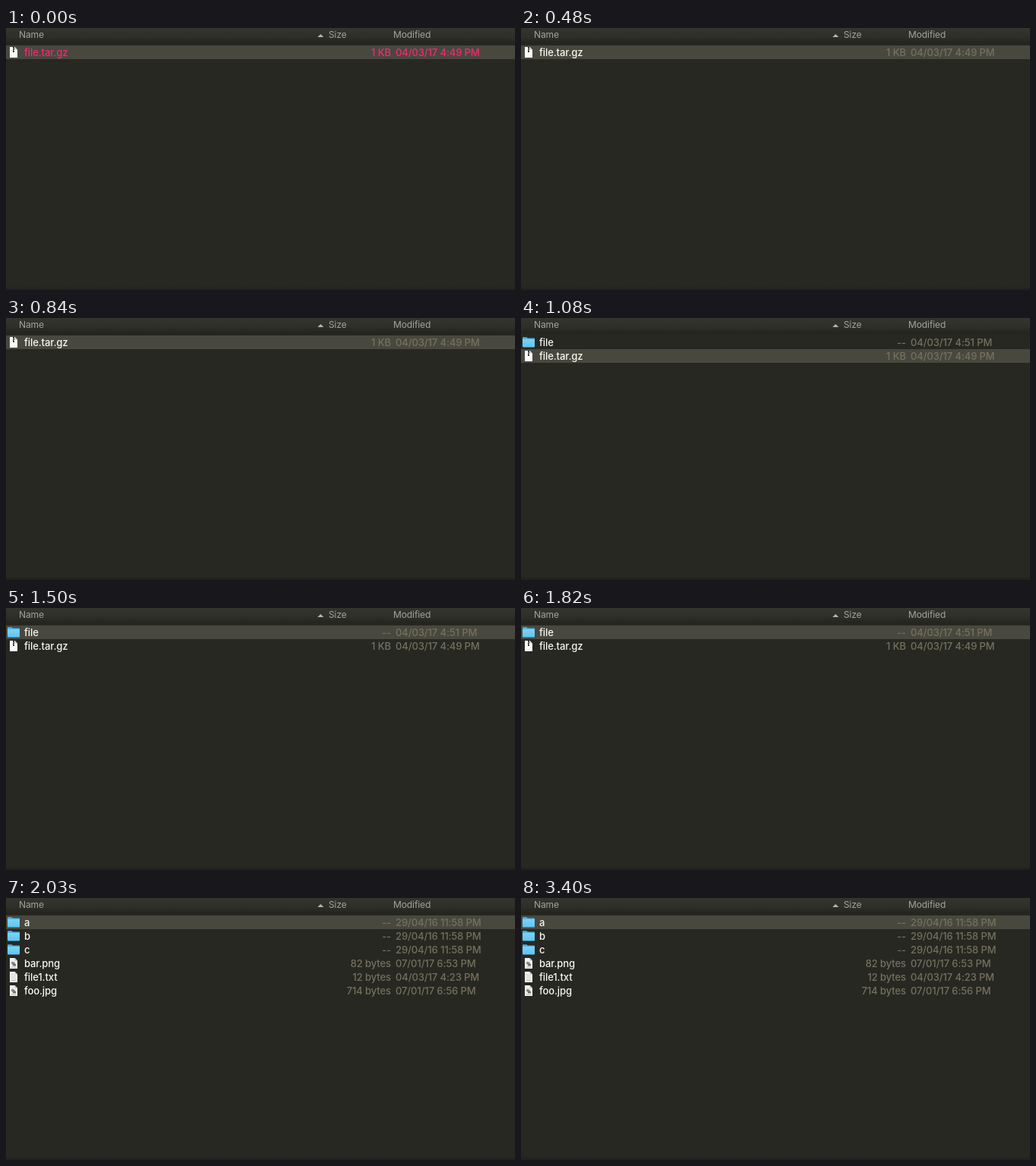
Animation, 669 px wide and 345 px high, one loop 4.31 s. Source, as an HTML page with a canvas:

```html
<!DOCTYPE html>
<html lang="en">
<head>
<meta charset="utf-8">
<title>File list</title>
<style>
html, body { margin: 0; width: 100%; height: 100%; overflow: hidden; background: #272822; }
canvas { display: block; width: 669px; height: 345px; }
</style>
</head>
<body>
<canvas id="stage"></canvas>
<script>
const W = 669, H = 345, LOOP = 4310;
const HEAD = 23, ROW = 18;
const BG = '#272822', SELECT = '#49483e', NAME = '#f8f8f2', DIM = '#75715e', PINK = '#f92672';
const FONT = 'Inter, "Liberation Sans", sans-serif';

const canvas = document.getElementById('stage');
const ctx = canvas.getContext('2d');
const dpr = window.devicePixelRatio || 1;
canvas.width = W * dpr;
canvas.height = H * dpr;
ctx.scale(dpr, dpr);

const entry = (icon, name, size, date) => ({ icon, name, size, date });
const archive = entry('zip', 'file.tar.gz', '1 KB', '04/03/17 4:49 PM');
const folder = entry('folder', 'file', '--', '04/03/17 4:51 PM');
const subfolder = name => entry('folder', name, '--', '29/04/16 11:58 PM');
const contents = [
  ...['a', 'b', 'c'].map(subfolder),
  entry('image', 'bar.png', '82 bytes', '07/01/17 6:53 PM'),
  entry('text', 'file1.txt', '12 bytes', '04/03/17 4:23 PM'),
  entry('image', 'foo.jpg', '714 bytes', '07/01/17 6:56 PM')
];

const scenes = [
  { start: 0, rows: [archive], selected: 0, marked: true },
  { start: 480, rows: [archive], selected: 0 },
  { start: 1080, rows: [folder, archive], selected: 1 },
  { start: 1500, rows: [folder, archive], selected: 0 },
  { start: 2030, rows: contents, selected: 0 }
];

function rect(x, y, w, h, fill) {
  ctx.fillStyle = fill;
  ctx.fillRect(x, y, w, h);
}

function poly(fill, ...pts) {
  ctx.fillStyle = fill;
  ctx.beginPath();
  pts.forEach(([x, y]) => ctx.lineTo(x, y));
  ctx.fill();
}

function fade(y0, y1, ...stops) {
  const g = ctx.createLinearGradient(0, y0, 0, y1);
  stops.forEach(([at, color]) => g.addColorStop(at, color));
  return g;
}

function label(str, x, y, color, font, align = 'left') {
  ctx.font = font + ' ' + FONT;
  ctx.letterSpacing = '-0.1px';
  ctx.textAlign = align;
  ctx.fillStyle = color;
  ctx.fillText(str, x, y);
}

function page(y, fill) {
  poly(fill, [5, y + 2], [11.5, y + 2], [15, y + 5.5], [15, y + 16], [5, y + 16]);
  poly('#c4c4c0', [11.5, y + 2], [15, y + 5.5], [11.5, y + 5.5]);
}

const icons = {
  zip(y) {
    page(y, '#fafafa');
    rect(9, y + 2, 2, 7, '#3a3a37');
    rect(9, y + 4, 1, 1, '#c8c8c4');
    rect(10, y + 6, 1, 1, '#c8c8c4');
  },
  folder(y) {
    poly('#4db4e4', [2, y + 3], [2.8, y + 2.2], [7.4, y + 2.2], [8.8, y + 3.6],
      [17.4, y + 3.6], [18, y + 4.2], [18, y + 8], [2, y + 8]);
    ctx.fillStyle = fade(y + 5, y + 16, [0, '#7ad3f9'], [1, '#5fc3f0']);
    ctx.beginPath();
    ctx.roundRect(2, y + 5, 16, 10.6, [0, 0, 1, 1]);
    ctx.fill();
  },
  image(y) {
    page(y, '#f0f0ee');
    ctx.fillStyle = '#85888a';
    ctx.beginPath();
    ctx.ellipse(9.6, y + 9.2, 2.8, 2, 0.5, 0, Math.PI * 2);
    ctx.fill();
    rect(9, y + 10, 4, 2.4, '#6c7073');
    rect(7, y + 13.5, 6, 1, '#bcbcba');
  },
  text(y) {
    page(y, '#f2f2f0');
    for (let i = 0; i < 4; i++) rect(6.5, y + 5 + i * 2, i ? 7 : 4, 0.7, '#c9c9c6');
    rect(7.5, y + 13.3, 5, 1, '#a8a8a5');
  }
};

function header() {
  rect(0, 0, W, HEAD, fade(0, HEAD, [0, '#34352e'], [0.55, '#2d2e28'], [0.85, '#24251f'], [1, BG]));
  const color = '#a3a39b';
  label('Name', 17, 13.4, color, '400 12px');
  label('Size', 424, 13.4, color, '400 12px');
  label('Modified', 509, 13.4, color, '400 12px');
  poly('#b5b5ae', [409.5, 12], [413.5, 8], [417.5, 12]);
}

function row(item, i, scene) {
  const y = HEAD + i * ROW, base = y + 13.5, font = '500 13px';
  if (i === scene.selected) rect(0, y, W, ROW, SELECT);
  icons[item.icon](y);
  label(item.name, 24, base, scene.marked ? PINK : NAME, font);
  const dim = scene.marked ? PINK : DIM;
  label(item.size, 506, base, dim, font, 'right');
  label(item.date, 512, base, dim, font);
}

function draw(now) {
  const t = now % LOOP;
  const scene = scenes.findLast(s => t >= s.start);
  rect(0, 0, W, H, BG);
  rect(0, H - 5, W, 5, fade(H - 5, H, [0, BG], [1, '#20211c']));
  header();
  scene.rows.forEach((item, i) => row(item, i, scene));
}

const begin = performance.now();
function tick() {
  draw(performance.now() - begin);
  requestAnimationFrame(tick);
}
tick();
</script>
</body>
</html>
```
